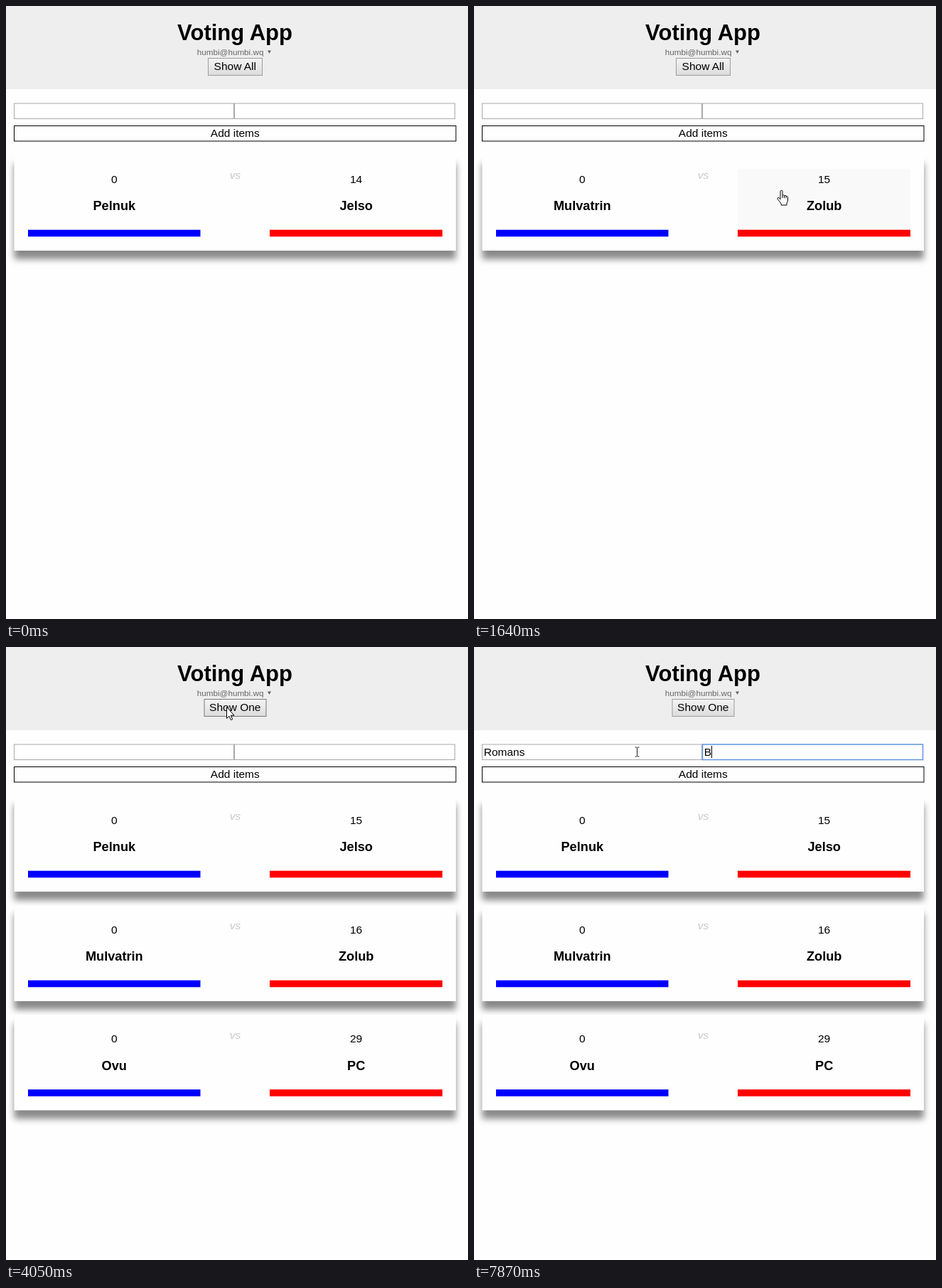
These frames come from a looping animation (650 px wide and 862 px high, 7.99 s). An HTML page:

```html
<!DOCTYPE html>
<html lang="en">
<head>
<meta charset="utf-8">
<title>Voting App</title>
<style>
  html, body { margin: 0; width: 650px; height: 862px; overflow: hidden; background: #fefefe; }
  svg { display: block; font: 15.5px "Liberation Sans", Arial, sans-serif; }
  text { white-space: pre; }
  .mid { text-anchor: middle; }
  .card { filter: drop-shadow(0 12.5px 5px rgba(0, 0, 0, .46)); }
  .name { font-size: 18.2px; font-weight: bold; }
  .vs { font-style: italic; fill: #c8c8c8; }
  .field { fill: #fff; stroke: #a9a9a9; }
  .field.focus { stroke: #6a9ae0; stroke-width: 1.6; }
  #button { fill: url(#up); stroke: #9c9c9c; }
  #button.hover { stroke: #787878; }
  #button.pressed { fill: url(#down); }
  #cursor path { fill: #fff; stroke: #000; stroke-linejoin: round; }
  #cursor #beam { fill: none; stroke: #222; }
</style>
</head>
<body>
<svg width="650" height="862" viewBox="0 0 650 862">
  <defs>
    <linearGradient id="up" x2="0" y2="1"><stop stop-color="#f4f4f4"/><stop offset="1" stop-color="#dcdcdc"/></linearGradient>
    <linearGradient id="down" x2="0" y2="1"><stop stop-color="#d8d8d8"/><stop offset="1" stop-color="#f0f0f0"/></linearGradient>
  </defs>
  <rect width="650" height="862" fill="#fefefe"/>
  <rect width="650" height="117" fill="#eee"/>
  <text class="mid" x="322" y="47.5" font-size="31" font-weight="bold">Voting App</text>
  <text x="268.7" y="69" font-size="11.7" fill="#666">humbi@humbi.wq</text>
  <path d="M368 62.5h5l-2.5 4.5z" fill="#666"/>
  <rect id="button" y="73.5" height="24"/>
  <text id="label" class="mid" x="322.3" y="90"></text>

  <rect class="field" x="11.5" y="137" width="309" height="21.5"/>
  <rect class="field" x="321.5" y="137" width="310" height="21.5"/>
  <text class="entry" x="13.7" y="152.5"></text>
  <text class="entry" x="323.7" y="152.5"></text>
  <rect id="caret" y="139" width="1" height="17"/>
  <rect x="11.5" y="168.5" width="621.5" height="21.5" fill="#fefefe" stroke="#000"/>
  <text class="mid" x="322.3" y="184">Add items</text>

  <g id="cards"></g>
  <g id="cursor">
    <path id="arrow" d="M.5.5V16.5L4 13.2 6.4 18.6 8.7 17.6 6.3 12.2H11Z"/>
    <path id="hand" d="M0 13V1.8a1.5 1.5 0 0 1 3 0V7.2q1.6-1 2.6.5 1.6-.8 2.5.6 2-.5 2.4 1.2V14q0 2-1.5 4.2V21H1.2V19Q0 17-3.8 12.6-4.8 10.6-2.6 10.4-1.2 11 0 13ZM3 7.2V11M5.6 7.7V11.2M8.1 8.3V11.4"/>
    <path id="beam" d="M-3-6.5H-1L0-5.8 1-6.5H3M0-5.8V5.8M-3 6.5H-1L0 5.8 1 6.5H3"/>
  </g>
</svg>
<script>
const LOOP = 7990;
const $ = id => document.getElementById(id);
const all = sel => [...document.querySelectorAll(sel)];

// left, right, right votes at the start, when that vote lands
const pairs = [
  ['Pelnuk', 'Jelso', 14, 1520],
  ['Mulvatrin', 'Zolub', 15, 2290],
  ['Ovu', 'PC', 28, 2940]
];
const showAllAt = 4050;

$('cards').innerHTML = [0, 154, 307.5].map(y => `
  <g class="pair" transform="translate(0 ${y})">
    <rect class="card" x="11.5" y="209.5" width="621.5" height="134.5" fill="#fefefe"/>
    <rect class="cell" x="371" y="229" width="243" height="86" fill="#fefefe"/>
    <rect x="31" y="314.7" width="242.5" height="9.6" fill="#00f"/>
    <rect x="371" y="314.7" width="243" height="9.6" fill="#f00"/>
    <text class="mid" x="152.3" y="248.5">0</text>
    <text class="mid vs" x="322.5" y="243">vs</text>
    <text class="mid count" x="492.5" y="248.5"></text>
    <text class="mid name" x="152.3" y="287"></text>
    <text class="mid name" x="492.7" y="287"></text>
  </g>`).join('');

const cards = all('.pair').map(g => ({
  g, count: g.querySelector('.count'), names: [...g.querySelectorAll('.name')]
}));
const cell = document.querySelector('.cell');
const fields = all('.field'), entries = all('.entry');

// start, end, hops, from, to
const moves = [
  [420, 1200, 7, [550, 814], [425, 237]],
  [1200, 1300, 1, [425, 237], [431, 259]],
  [2940, 3710, 7, [431, 259], [310, 84]],
  [4580, 4940, 3, [310, 84], [229.5, 147.5]]
];
const shades = [[0, 254], [1000, 249], [1300, 243], [1420, 237], [1520, 244], [1640, 249], [3160, 252], [3380, 254]];
const typed = [6020, 6140, 6360, 6480, 6580, 6680, 6910];

const put = (el, s) => { if (el.textContent !== s) el.textContent = s; };
const show = (el, on) => el.setAttribute('visibility', on ? 'visible' : 'hidden');
const last = (list, t) => list.filter(row => row[0] <= t).pop();

function pointer(t) {
  const move = last(moves, t);
  if (!move) return null;
  const [start, end, hops, a, b] = move;
  const u = Math.min(hops, Math.floor((t - start) / (end - start) * hops + 1e-6)) / hops;
  const e = u * u * (3 - 2 * u);
  return a.map((v, i) => v + (b[i] - v) * e);
}

function drawCursor(t) {
  const p = pointer(t);
  show($('cursor'), p);
  if (!p) return;
  const [x, y] = p;
  const within = (l, top, r, bottom) => x >= l && x <= r && y >= top && y <= bottom;
  const kind = within(371, 229, 614, 325) ? 'hand' : within(11, 137, 632, 158) ? 'beam' : 'arrow';
  for (const id of ['arrow', 'hand', 'beam']) $(id).style.display = id === kind ? '' : 'none';
  $('cursor').setAttribute('transform', `translate(${x} ${y})`);
  $('button').classList.toggle('hover', within(279, 73, 366, 98));
}

function drawCards(t) {
  const open = t >= showAllAt;
  const current = pairs.filter(p => p[3] <= t).length % pairs.length;
  cards.forEach(({ g, count, names }, i) => {
    show(g, open || i === 0);
    const [left, right, votes, at] = pairs[open ? i : (i + current) % pairs.length];
    put(names[0], left);
    put(names[1], right);
    put(count, String(votes + (t >= at)));
  });
  const v = last(shades, t)[1];
  cell.setAttribute('fill', `rgb(${v},${v},${v})`);
  const width = open ? 87 : 76;
  $('button').setAttribute('x', 322.5 - width / 2);
  $('button').setAttribute('width', width);
  $('button').classList.toggle('pressed', t >= 3930 && !open);
  put($('label'), open ? 'Show One' : 'Show All');
}

function drawFields(t) {
  const focus = t < 5140 ? -1 : t < 7340 ? 0 : 1;
  put(entries[0], 'Romans '.slice(0, typed.filter(at => at <= t).length));
  put(entries[1], t >= 7870 ? 'B' : '');
  fields.forEach((f, i) => f.classList.toggle('focus', i === focus));
  show($('caret'), focus >= 0 && !(t >= 5590 && t < 6020));
  if (focus >= 0) {
    const el = entries[focus];
    const len = el.textContent ? el.getComputedTextLength() : 0;
    $('caret').setAttribute('x', [13, 324][focus] + Math.round(len));
  }
}

const begin = performance.now();
function draw() {
  const t = (performance.now() - begin) % LOOP;
  $('button').classList.remove('hover');
  drawCards(t);
  drawFields(t);
  drawCursor(t);
  requestAnimationFrame(draw);
}
draw();
</script>
</body>
</html>
```
